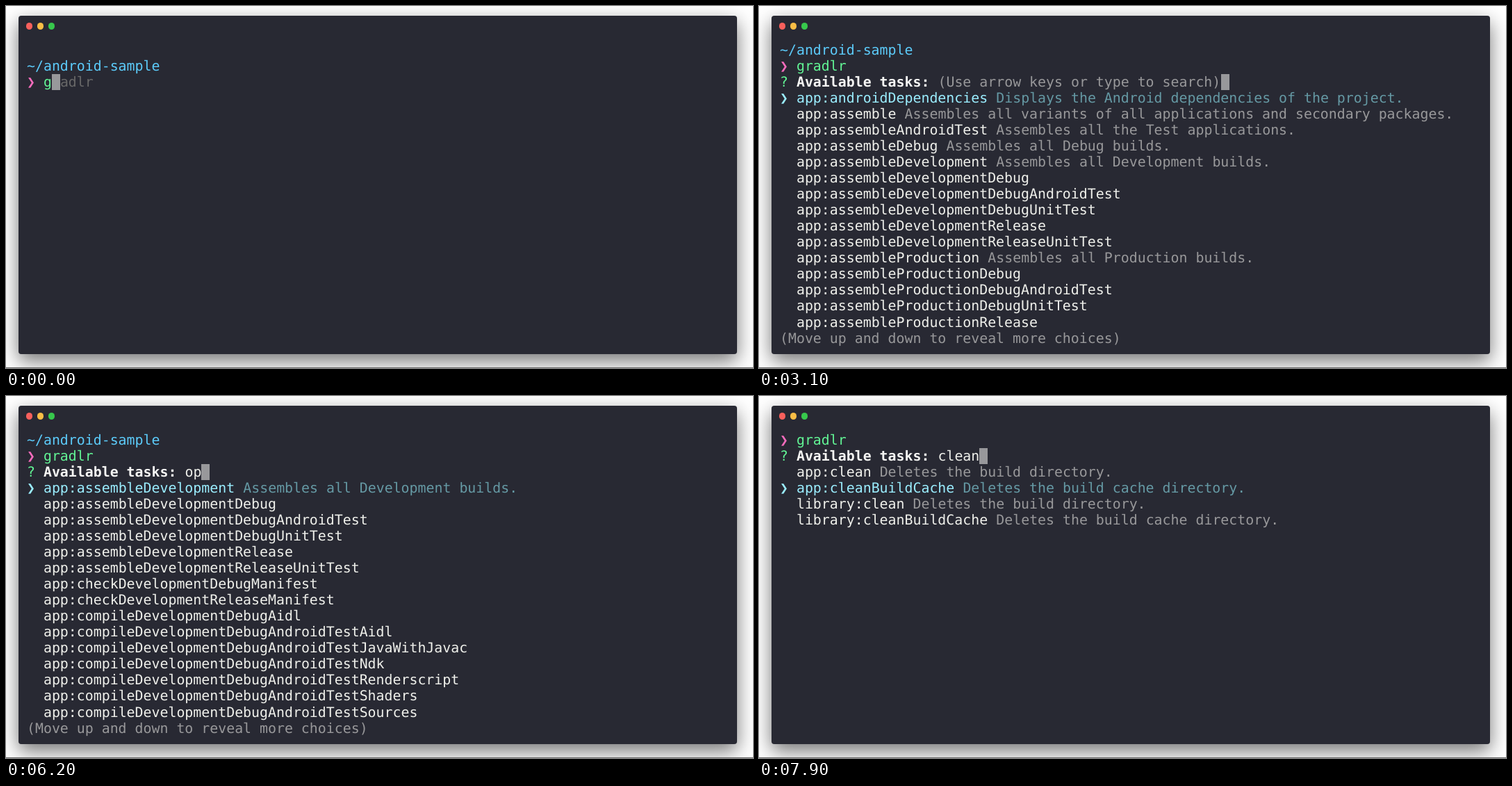
An HTML page for the animation above (8 s loop, 1075 px wide and 521 px high).

```html
<!DOCTYPE html>
<html lang="en">
<head>
<meta charset="utf-8">
<title>Terminal task picker</title>
<style>
html, body { margin: 0; width: 100%; height: 100%; overflow: hidden; background: #fff; }
#stage { position: relative; width: 1075px; height: 521px; overflow: hidden; }
#stage::after { content: ""; position: absolute; left: 0; right: 0; top: 520px; height: 1px; background: #6b6b6b; }
#window {
  position: absolute; left: 18px; top: 14px; width: 1034px; height: 486.5px;
  border-radius: 4px; background: #282933; box-shadow: 0 10px 28px rgba(0, 0, 0, .55);
}
.light { position: absolute; top: 24.2px; width: 9.6px; height: 9.6px; border-radius: 50%; }
#screen {
  position: absolute; left: 30px; top: 51.5px;
  font: 19.885px/23.06px "DejaVu Sans Mono", "Liberation Mono", monospace;
  text-rendering: geometricPrecision; font-variant-ligatures: none;
}
#screen span, #screen i { position: absolute; white-space: pre; }
.path { color: #5ccbfa; }
.prompt { color: #f96cbd; }
.ok { color: #62f595; }
.text { color: #eff0eb; }
.bold { color: #f6f6f4; font-weight: bold; }
.dim { color: #98989a; }
.ghost { color: #686868; }
.pick { color: #9aedfe; }
.pickdim { color: #6599a4; }
.cursor { width: 12px; height: 23px; background: #98989b; }
.dot { width: 2.4px; height: 2.4px; border-radius: 50%; background: #eff0eb; }
</style>
</head>
<body>
<div id="stage">
  <div id="window"></div>
  <div class="light" style="left:28.7px;background:#f8605c"></div>
  <div class="light" style="left:44.7px;background:#f9bd45"></div>
  <div class="light" style="left:60.6px;background:#37c84c"></div>
  <div id="screen"></div>
</div>
<script>
const LOOP = 8000, CELL = 11.972, LINE = 23.06;
const screen = document.getElementById('screen');

const builds = kind => `Assembles all ${kind} builds.`;
const dev = [
  ['assembleDevelopment', builds('Development')],
  ['assembleDevelopmentDebug'],
  ['assembleDevelopmentDebugAndroidTest'],
  ['assembleDevelopmentDebugUnitTest'],
  ['assembleDevelopmentRelease'],
  ['assembleDevelopmentReleaseUnitTest']
];
const app = list => list.map(([name, info]) => ['app:' + name, info]);
const both = list => ['app', 'library'].flatMap(m => list.map(([name, info]) => [`${m}:${name}`, info(m)]));

const views = {
  all: app([
    ['androidDependencies', 'Displays the Android dependencies of the project.'],
    ['assemble', 'Assembles all variants of all applications and secondary packages.'],
    ['assembleAndroidTest', 'Assembles all the Test applications.'],
    ['assembleDebug', builds('Debug')],
    ...dev,
    ['assembleProduction', builds('Production')],
    ...['Debug', 'DebugAndroidTest', 'DebugUnitTest', 'Release'].map(s => ['assembleProduction' + s])
  ]),
  op: app([
    ...dev,
    ['checkDevelopmentDebugManifest'],
    ['checkDevelopmentReleaseManifest'],
    ['compileDevelopmentDebugAidl'],
    ...['Aidl', 'JavaWithJavac', 'Ndk', 'Renderscript', 'Shaders', 'Sources']
      .map(s => ['compileDevelopmentDebugAndroidTest' + s])
  ]),
  props: both([['properties', m => `Displays the properties of project ':${m}'`]]),
  clean: both([
    ['clean', () => 'Deletes the build directory.'],
    ['cleanBuildCache', () => 'Deletes the build cache directory.']
  ])
};

const HINT = '(Use arrow keys or type to search)';
// start, query, view (empty while searching), picked line, top row
const steps = [
  [2800, HINT, 'all', 0, 0],
  [4000, 'o', '', 0, 0],
  [4200, 'op', '', 0, 0],
  [4400, 'ope', '', 0, 0],
  [4600, 'oper', '', 0, 0],
  [4700, 'oper', 'props', 0, 0],
  [5700, 'ope', '', 0, 0],
  [5900, 'op', '', 0, 0],
  [6000, 'op', 'op', 0, 0],
  [6400, 'o', '', 0, 0],
  [6600, '', 'all', 0, 0],
  [6800, 'c', '', 0, 0],
  [6900, 'cl', '', 0, -1],
  [7000, 'cle', '', 0, -1],
  [7100, 'clean', '', 0, -1],
  [7200, 'clean', 'clean', 0, -1],
  [7500, 'clean', 'clean', 1, -1]
];

const esc = s => s.replace(/&/g, '&amp;').replace(/</g, '&lt;');
const put = (row, col, cls, text = '') => row < 0 ? '' :
  `<span class="${cls}" style="left:${(col * CELL).toFixed(2)}px;top:${(row * LINE).toFixed(2)}px">${esc(text)}</span>`;

const shell = (top, cmd) =>
  put(top, 0, 'path', '~/android-sample') +
  put(top + 1, 0, 'prompt', '❯') +
  put(top + 1, 2, 'ok', cmd);

function typing(t) {
  const word = 'gradlr', n = Math.min(6, 1 + Math.floor(t / 100));
  const out = shell(1, word.slice(0, n));
  if (t >= 700) return out + put(3, 0, 'cursor');
  return out + put(2, 3 + n, 'ghost', word.slice(n + 1)) + put(2, 2 + n, 'cursor');
}

function parsing(t) {
  const wheel = '⠋⠙⠹⠸⠼⠴⠦⠧⠇⠏';
  const i = (Math.floor((t - 1200) / 80) + 10) % 10;
  const bits = wheel.charCodeAt(i) & 63;
  let dots = '';
  for (let b = 0; b < 6; b++) {
    if (!(bits >> b & 1)) continue;
    const x = 3 + (b > 2 ? 4.8 : 0), y = 3 * LINE + 5.6 + (b % 3) * 4.6;
    dots += `<i class="dot" style="left:${x}px;top:${y.toFixed(2)}px"></i>`;
  }
  return shell(1, 'gradlr') + dots + put(3, 2, 'text', 'Parsing gradle tasks...');
}

function menu([, query, view, picked, top]) {
  let row = top + 2;
  let out = shell(top, 'gradlr') +
    put(row, 0, 'ok', '?') +
    put(row, 2, 'bold', 'Available tasks:') +
    put(row, 19, query === HINT ? 'dim' : 'text', query) +
    put(row, 19 + query.length, 'cursor');
  row++;
  if (!view) return out + put(row, 2, 'dim', 'Searching...');
  const list = views[view];
  list.forEach(([name, info], i) => {
    const on = i === picked;
    if (on) out += put(row, 0, 'pick', '❯');
    out += put(row, 2, on ? 'pick' : 'text', name);
    if (info) out += put(row, 3 + name.length, on ? 'pickdim' : 'dim', info);
    row++;
  });
  if (list.length > 14) out += put(row, 0, 'dim', '(Move up and down to reveal more choices)');
  return out;
}

function scene(t) {
  if (t < 1000) return typing(t);
  if (t < steps[0][0]) return parsing(t);
  return menu(steps.filter(s => s[0] <= t).pop());
}

let shown = '';
function draw() {
  const html = scene(performance.now() % LOOP);
  if (html !== shown) screen.innerHTML = shown = html;
  requestAnimationFrame(draw);
}
draw();
</script>
</body>
</html>
```
